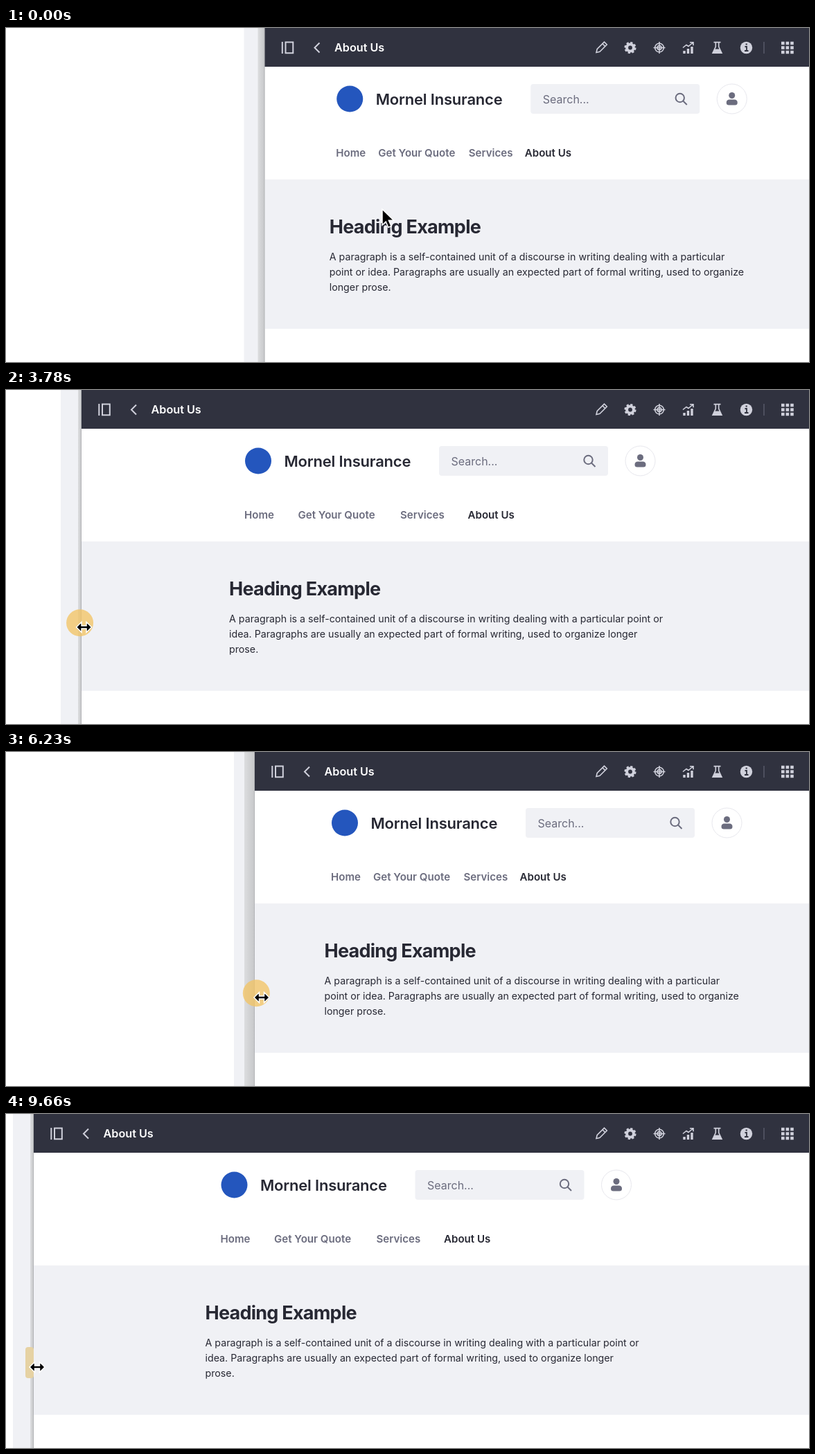
Recreate the animation shown at these times as an HTML page. Size 1159 by 483 pixels, loop 9.73 s.

```html
<!DOCTYPE html>
<html lang="en">
<head>
<meta charset="utf-8">
<title>Resizable page preview</title>
<style>
html, body { margin: 0; width: 100%; height: 100%; overflow: hidden; background: #fff; }
svg { display: block; width: 100vw; height: 100vh; }
text { font-family: Inter, sans-serif; font-optical-sizing: none; fill: #272833; white-space: pre; }
.line { fill: none; stroke: #d0d1dc; stroke-width: 2; }
.thin { stroke-width: 1.6; }
.solid { fill: #d0d1dc; }
.nav text { font-size: 15.1px; font-weight: 600; fill: #6b6c7e; }
.nav text:last-child { fill: #272833; }
.body text { font-size: 14.23px; }
.body .title { font-size: 27px; font-weight: 700; letter-spacing: -.75px; }
</style>
</head>
<body>
<svg viewBox="0 0 1159 483">
  <defs>
    <linearGradient id="shade"><stop stop-color="#dcdddf"/><stop offset="1" stop-color="#c6c7c9"/></linearGradient>
  </defs>
  <rect width="1159" height="483" fill="#fff"/>
  <g id="panel">
    <rect x="-30" width="30" height="483" fill="#f0f1f5"/>
    <rect id="edge" height="483" fill="url(#shade)"/>
    <rect width="1159" height="483" fill="#fff"/>
    <rect y="219" width="1159" height="216" fill="#f0f1f5"/>
    <path d="M-.5 0V483" stroke="#b2b3b6"/>
    <rect width="1159" height="56" fill="#30323f"/>
    <path class="line" d="M25.3 20V37M30 20.5h10.8v15.8H30z"/>
    <path class="line" d="M79 21.5l-7 7 7 7"/>
    <text x="100.5" y="34" font-size="16.2" font-weight="600" style="fill:#fff">About Us</text>
  </g>

  <g id="tools">
    <path class="line thin" d="M852 35.5l1.2-5L863.5 20.2l3.8 3.8L857 34.3zM861 22.8l3.8 3.8"/>
    <g class="line" transform="translate(901 28.5)">
      <circle r="4.9" stroke-width="4"/>
      <circle r="7.3" stroke-width="2.6" stroke-dasharray="3.2 2.533"/>
    </g>
    <path class="line thin" d="M934.5 28.5h17M943 20v17M936.7 28.5a6.3 6.3 0 1 0 12.6 0a6.3 6.3 0 1 0-12.6 0M940 28.5a3 3 0 1 0 6 0a3 3 0 1 0-6 0"/>
    <path class="line" d="M979 37v-4M984.5 37v-7M990 37v-10" style="stroke-width:3.4"/>
    <path class="line thin" d="M977 28.5l5-4 3 2 6.5-5.5M987 20.8h5v4.5"/>
    <path class="line thin" d="M1021.5 20.6h10M1024.3 21v6l-4.3 9.2h13l-4.3-9.2v-6"/>
    <path class="solid" d="M1023 30.5h7l3 5.700h-13z"/>
    <circle class="solid" cx="1068.5" cy="28.5" r="8.7"/>
    <path d="M1066.5 27h2.5v6M1066 33h5.5M1067.6 23.5h2.2" fill="none" stroke="#30323f" stroke-width="1.8"/>
    <path d="M1094 20v17" stroke="#6b6c7e"/>
    <path class="line" d="M1119 22h18M1119 28.5h18M1119 35h18" style="stroke-width:4.6;stroke-dasharray:4.6 2"/>
  </g>

  <g id="header">
    <circle cx="20" cy="102.5" r="19" fill="#2456bd"/>
    <text x="57.5" y="110.5" font-size="22" font-weight="600" letter-spacing="-.2">Mornel Insurance</text>
    <rect x="281" y="81" width="244" height="43" rx="4" fill="#f0f1f5"/>
    <text x="298.5" y="108.5" font-size="16" style="fill:#6b6c7e">Search...</text>
    <g fill="none" stroke="#6b6c7e" stroke-width="2">
      <circle cx="496.5" cy="101" r="6.2"/><path d="M501 105.5l5.5 5.5"/>
    </g>
    <circle cx="571.5" cy="102.5" r="21.5" fill="#fff" stroke="#e7e7ed"/>
    <g fill="#6b6c7e">
      <circle cx="571.5" cy="97.5" r="4.5"/>
      <path d="M563.5 108q0-4.500 4.500-4.500h7q4.500 0 4.500 4.500 0 3.500-3.500 3.500h-9q-3.500 0-3.500-3.500z"/>
    </g>
    <g class="nav">
      <text y="186">Home</text><text y="186">Get Your Quote</text><text y="186">Services</text><text y="186">About Us</text>
    </g>
  </g>

  <g id="section" class="body">
    <text class="title" y="297">Heading Example</text>
    <text class="copy" y="336"/><text class="copy" y="358"/><text class="copy" y="380"/>
  </g>

  <circle id="press" fill="#f3c566" fill-opacity=".78"/>
  <rect id="release" width="12" height="45" rx="4" fill="#e6d2a3"/>
  <g stroke="#fff" stroke-width="1.5">
    <path id="arrow" d="M0 0V23l5.2-5 3.6 8.3 4.2-1.8-3.6-8.2h7.3z"/>
    <path id="resize" d="M-11 0l7.5-7.5v5.5h7v-5.500l7.500 7.500-7.500 7.500v-5.500h-7v5.500z"/>
  </g>
</svg>
<script>
const LOOP = 9730, STEP = 70, WIDE_BELOW = 150;
const $ = id => document.getElementById(id);
const all = selector => [...document.querySelectorAll(selector)];
const move = (el, x, y = 0) => el.setAttribute('transform', `translate(${x} ${y})`);
const show = (el, on) => el.setAttribute('visibility', on ? 'visible' : 'hidden');

// Smooth curve through [time, value] points without overshoot
function curve(points) {
  const slope = points.slice(1).map(([t, v], i) => (v - points[i][1]) / (t - points[i][0]));
  const tangent = points.map((_, i) => {
    const a = slope[i - 1] || 0, b = slope[i] || 0;
    return a * b > 0 ? 2 * a * b / (a + b) : 0;
  });
  return t => {
    if (t <= points[0][0]) return points[0][1];
    const i = points.findIndex(p => p[0] >= t) - 1;
    if (i < 0) return points.at(-1)[1];
    const [t0, v0] = points[i], [t1, v1] = points[i + 1];
    const h = t1 - t0, u = (t - t0) / h, w = 1 - u;
    return v0 * w * w * (1 + 2 * u) + v1 * u * u * (1 + 2 * w)
      + h * u * w * (tangent[i] * w - tangent[i + 1] * u);
  };
}

const panelX = curve([[2200, 373.5], [2310, 364], [2730, 253], [3710, 119], [3780, 109],
  [3920, 107], [4410, 107], [4550, 108], [4620, 112], [5040, 179], [5600, 261], [6230, 359],
  [6500, 372], [7420, 230], [7490, 222], [8470, 92], [9450, 51], [9660, 40]]);
const dragY = curve([[1820, 331], [2310, 333], [3780, 343], [5040, 349], [6230, 355], [7420, 358], [9660, 366]]);
const arrowX = curve([[0, 543], [560, 393], [840, 393], [1400, 375]]);
const arrowY = curve([[0, 262], [560, 332], [840, 332], [1400, 328]]);

const layouts = {
  narrow: {
    nav: [0, 61, 191.5, 272.5], inset: 280,
    copy: ['A paragraph is a self-contained unit of a discourse in writing dealing with a particular',
      'point or idea. Paragraphs are usually an expected part of formal writing, used to organize',
      'longer prose.']
  },
  wide: {
    nav: [0, 77.5, 225, 322.5], inset: 267.5,
    copy: ['A paragraph is a self-contained unit of a discourse in writing dealing with a particular point or',
      'idea. Paragraphs are usually an expected part of formal writing, used to organize longer',
      'prose.']
  }
};
const links = all('.nav text'), lines = all('.copy');
let current;

function setLayout(layout) {
  if (layout === current) return;
  current = layout;
  links.forEach((el, i) => el.setAttribute('x', layout.nav[i]));
  lines.forEach((el, i) => el.textContent = layout.copy[i]);
}

function draw(now) {
  const t = Math.floor(now % LOOP / STEP) * STEP;
  const x = panelX(t), y = dragY(t);
  setLayout(x < WIDE_BELOW ? layouts.wide : layouts.narrow);
  move($('panel'), x);
  move($('header'), x / 2 + 289.5);
  move($('section'), x / 2 + current.inset);

  const edge = t < 1820 ? 10 : t >= 5600 && t < 7560 ? 15 : 5;
  $('edge').setAttribute('x', -edge);
  $('edge').setAttribute('width', edge);

  show($('arrow'), t < 1400);
  show($('resize'), t >= 1400);
  show($('press'), t >= 1820 && t < 9520);
  show($('release'), t >= 9520);

  // The pointer leads, the press mark follows, the panel comes last
  move($('arrow'), arrowX(t), arrowY(t));
  move($('resize'), panelX(t + 70) + 5, y);
  move($('press'), panelX(t + 50) - 1.3, y - 6.3);
  $('press').setAttribute('r', 19.5 * Math.min(1, Math.max(0, (t - 1750) / 210)));
  move($('release'), x - 12, y - 29);
}

const start = performance.now();
function tick() {
  draw(performance.now() - start);
  requestAnimationFrame(tick);
}
tick();
</script>
</body>
</html>
```
